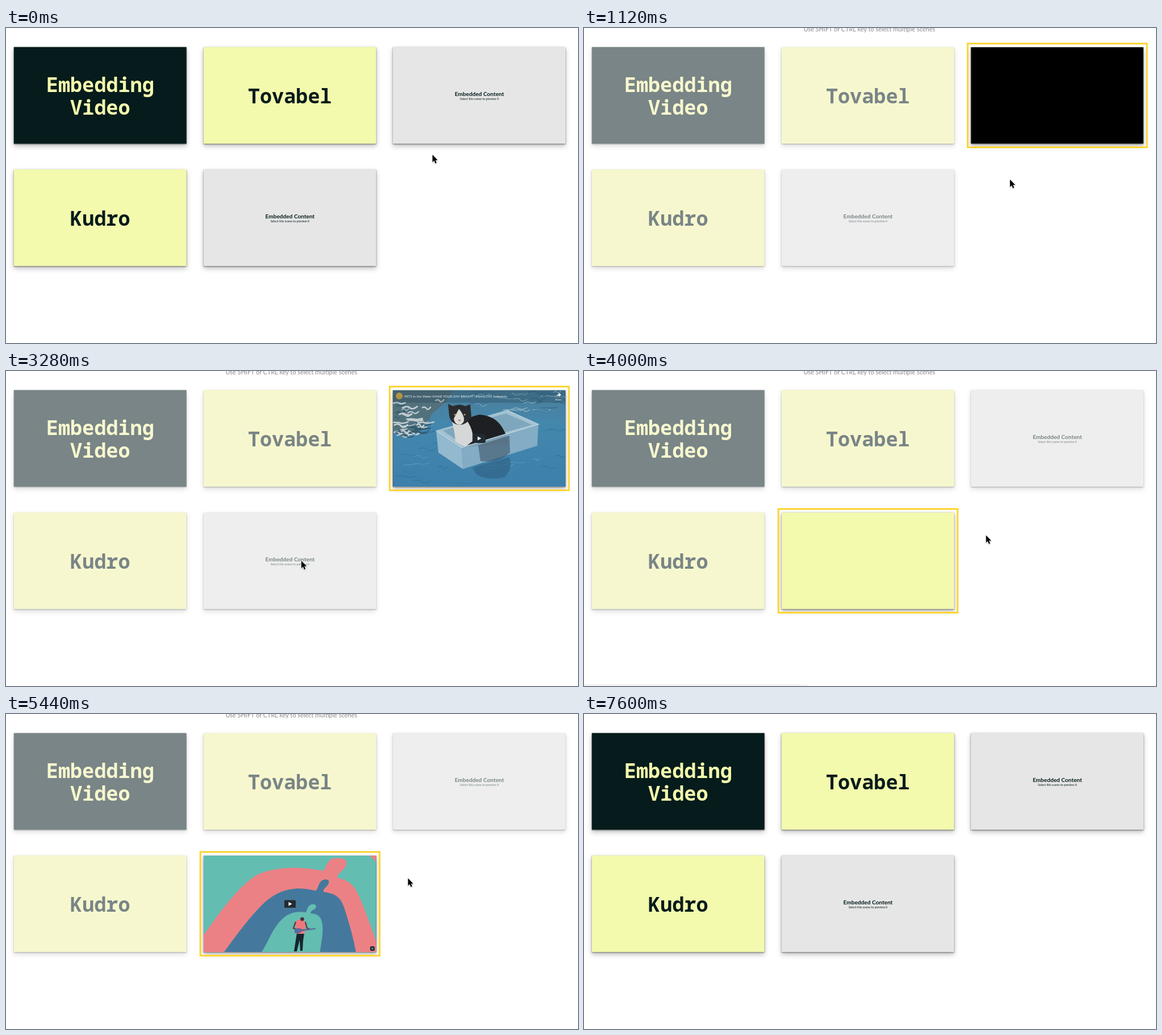
Animation, 1007 px wide and 556 px high, one loop 7.68 s. Source, as an HTML page:

```html
<!DOCTYPE html>
<html lang="en">
<head>
<meta charset="utf-8">
<title>Embedding Video</title>
<style>
  html, body { margin: 0; width: 100%; height: 100%; overflow: hidden; background: #fff; }
  svg { display: block; width: 1007px; height: 556px; }
  text { text-anchor: middle; font-family: Lato, sans-serif; }
  .card { --ink: #061b1b; --pale: #f3f9ad; --grey: #e6e6e6; --near: .5; --far: .24; }
  .dim { --ink: #798586; --pale: #f7f7cf; --grey: #eeeeee; --near: .27; --far: .13; }
  .face {
    filter: drop-shadow(0 1px 1px rgba(0, 0, 0, var(--near)))
            drop-shadow(0 4px 4.5px rgba(0, 0, 0, var(--far)));
  }
  .ink { fill: var(--ink); }
  .pale { fill: var(--pale); }
  .grey { fill: var(--grey); }
  .big { font: bold 35.2px "Noto Sans Mono", monospace; }
  .head { font-size: 10.1px; font-weight: bold; }
  .sub { font-size: 5.25px; }
  .ring { fill: none; stroke: #fdd535; stroke-width: 3; }
  #hint { font-size: 10.95px; fill: #8a8a8a; }
  #ripples { filter: blur(.5px); }
  #cat { filter: blur(.4px); }
</style>
</head>
<body>
<svg viewBox="0 0 1007 556" xmlns="http://www.w3.org/2000/svg">
  <defs>
    <clipPath id="frame"><rect width="303.5" height="170"/></clipPath>
    <linearGradient id="water" x2="0" y2="1">
      <stop offset="0" stop-color="#4c7d98"/>
      <stop offset=".35" stop-color="#4487ad"/>
      <stop offset="1" stop-color="#3c80ab"/>
    </linearGradient>

    <g id="pool" clip-path="url(#frame)">
      <rect width="304" height="170" fill="url(#water)"/>
      <path d="M0 0H104L92 22 70 40 56 66 20 84 0 72Z" fill="#52717d"/>
      <g id="ripples" fill="none" stroke-linecap="round"/>
      <g id="cat">
        <path d="M140 136 205 118Q212 138 196 154 166 160 146 148Z" fill="#2f5f80" opacity=".6"/>
        <path d="M76 71 200 35 256 60 121 102Z" fill="#a3c1d0"/>
        <path d="M88 71 199 41 245 61 122 95Z" fill="#7ea7bd"/>
        <path d="M126 60Q131 47 152 43 181 45 193 67 204 85 201 94L124 101Z" fill="#1d1f23"/>
        <path d="M103 52Q113 57 129 52 143 71 140 90L127 100 110 91Q109 73 103 52Z" fill="#d6d8d8"/>
        <path d="M97 24 105 28Q118 23 127 28L136 25 138 47Q130 61 117 61 102 60 99 45Z" fill="#2a2b2f"/>
        <path d="M116 33Q122 39 125 49 126 59 117 61 108 60 107 50Z" fill="#dedcd6"/>
        <path d="M114 52H120L117 55Z" fill="#a98281"/>
        <circle cx="109" cy="43" r="1.5" fill="#a6a66a"/>
        <circle cx="126" cy="43" r="1.5" fill="#a6a66a"/>
        <path d="M76 71 121 101 123 139 80 110Z" fill="#9dbfd3" opacity=".9"/>
        <path d="M121 101 256 60 254 98 123 139Z" fill="#8cb2c9" opacity=".88"/>
        <path d="M150 97 205 80 206 110Q186 129 154 125Z" fill="#3e5468" opacity=".6"/>
        <path d="M76 71 121 101 256 60 200 35" fill="none" stroke="#bcd3de" stroke-width="1.5"/>
      </g>
      <rect width="304" height="22" fill="#102a38" opacity=".22"/>
      <circle cx="11" cy="10" r="6" fill="#b19345"/>
      <text x="20" y="12.5" font-size="6" fill="#e8eef0" style="text-anchor:start">PETS in the Water MAKE YOUR DAY BRIGHT - Funny CAT moments</text>
      <path d="M288 11Q289 7 292 7V4.500L296 8 292 11.500V9Q290 9 288 11Z" fill="#fff"/>
      <text x="291" y="18" font-size="4.5" fill="#fff">Share</text>
      <rect x="140" y="77" width="23" height="16" rx="3" fill="#202a31"/>
      <path d="M149 81.500V88.500L155.500 85Z" fill="#fff"/>
    </g>

    <g id="arches" clip-path="url(#frame)">
      <rect width="304" height="170" fill="#63bdb1"/>
      <path d="M291 0H304V13Q300 5 291 0Z" fill="#ec8185"/>
      <path d="M0 140C26 104 57 58 92 35 125 18 174 19 210 27 218 19 218 6 229 5 247 3 253 7 251 16 249 26 238 27 235 39 253 42 264 51 272 68 284 95 294 124 304 152V170H0Z" fill="#ec8185"/>
      <path d="M36 170C58 140 82 106 109 81 137 57 165 54 197 62 203 57 201 47 210 43 219 40 223 45 219 51 216 56 210 58 211 64 230 67 241 72 247 91 255 115 264 146 268 170Z" fill="#44799d"/>
      <path d="M102 170C113 153 119 136 128 124 140 108 153 96 180 100 183 94 183 88 190 86 198 85 200 89 196 94 191 97 187 99 189 102 202 103 207 108 209 122 211 140 206 156 205 170Z" fill="#63bdb1"/>
      <path d="M164 137H177L175 151 174 168H170L169 149 164 169H159Z" fill="#15262e"/>
      <path d="M162 116Q171 109 179 117L178 138H163Z" fill="#ed777d"/>
      <path d="M162 117 158 128 170 133M179 117 182 128 187 130" fill="none" stroke="#6b3e42" stroke-width="2.500"/>
      <circle cx="173.500" cy="112" r="3.300" fill="#4a3038"/>
      <path d="M160 130Q167 126 173 130L197 128V130L174 133Q166 140 160 136Z" fill="#596a9b"/>
      <rect x="142" y="78.500" width="20" height="13.500" rx="1.500" fill="#242b30"/>
      <path d="M149.500 81.800V88.800L155.500 85.300Z" fill="#fff"/>
      <rect x="293" y="160" width="8" height="8" rx="2.500" fill="#17272c"/>
      <path d="M295 164H299M297 162V166" stroke="#a9ccca" stroke-width=".8"/>
    </g>
  </defs>

  <rect width="1007" height="556" fill="#fff"/>
  <text id="hint" x="502.3" y="6">Use SHIFT or CTRL key to select multiple scenes</text>
  <g id="cards"></g>
  <path id="bar" d="M0 553H386Q393 553 398 556H0Z" fill="#f3f3f3"/>
  <path id="cursor" d="M0 0V13L3 10.300 5.100 15.200 7.200 14.300 5.200 9.500H9.200Z" fill="#000" stroke="#fff" stroke-width="1"
    paint-order="stroke" style="filter:drop-shadow(0 1px 1px rgba(0,0,0,.3))"/>
</svg>
<script>
const LOOP = 7680, STEP = 80;
const $ = id => document.getElementById(id);
const show = (el, on) => el.setAttribute("visibility", on ? "visible" : "hidden");

const big = (s, y, tone = "ink") => `<text class="big ${tone}" x="151.8" y="${y}">${s}</text>`;
const embed = `<g class="ink"><text class="head" x="152" y="86">Embedded Content</text>
  <text class="sub" x="152" y="92.700">Select this scene to preview it</text></g>`;

const cards = [
  { x: 14, y: 34, fill: "ink", body: big("Embedding", 79, "pale") + big("Video", 119, "pale") },
  { x: 348, y: 34, fill: "pale", body: big("Tovabel", 99) },
  { x: 681.3, y: 34, fill: "grey", body: embed, art: "pool", open: 560, close: 3600, black: 960, play: 1680 },
  { x: 14, y: 250, fill: "pale", body: big("Kudro", 99) },
  { x: 348, y: 250, fill: "grey", body: embed, art: "arches", open: 3600, close: 5680, black: 4160, play: 4160 }
];

$("cards").innerHTML = cards.map(c => `<g class="card" transform="translate(${c.x} ${c.y})">
  <rect class="face ${c.fill}" x="-.2" y="-.4" width="303.900" height="170.600"/>
  <g class="body">${c.body}</g>
  ${c.art ? `<g class="live"><rect class="load" width="303.500" height="170"/>
    <use href="#${c.art}"/><rect class="ring" x="-5.800" y="-6.500" width="315.500" height="183"/></g>` : ""}
</g>`).join("");

cards.forEach((c, i) => {
  c.el = $("cards").children[i];
  const pick = s => c.el.querySelector(s);
  Object.assign(c, { text: pick(".body"), live: pick(".live"), load: pick(".load"), clip: pick("use") });
});

// Seeded light streaks on the water
let seed = 7;
const rnd = () => (seed = seed * 16807 % 2147483647) / 2147483647;
const streak = (x, y, w, tone, thick) =>
  `<path d="M${x} ${y}q${w / 3} ${-5 * rnd()} ${w / 2} ${2 - 3 * rnd()}t${w / 2} ${-3 * rnd()}" stroke="${tone}" stroke-width="${thick}"/>`;
let waves = "";
for (let i = 0; i < 42; i++) {
  const y = 18 + rnd() * 62;
  waves += streak(rnd() * (96 - y * 0.8), y, 8 + rnd() * 22, rnd() < 0.6 ? "#c3cfd2" : "#355c70", 1 + rnd() * 2);
}
for (let i = 0; i < 34; i++) {
  waves += streak(130 + rnd() * 160, 2 + rnd() * 36, 10 + rnd() * 25, rnd() < 0.5 ? "#7fabc0" : "#3d7193", 1 + rnd());
}
for (let i = 0; i < 30; i++) {
  waves += streak(rnd() * 290, 70 + rnd() * 98, 10 + rnd() * 28, rnd() < 0.4 ? "#5594b9" : "#35769f", 0.8 + rnd());
}
$("ripples").innerHTML = waves;

// time, x, y of the pointer tip
const path = [
  [0, 750.8, 223.7], [80, 750.8, 223.7], [480, 800, 150], [640, 800, 150],
  [1040, 750, 267.5], [2400, 750, 267.5], [2800, 668.7, 280.3], [3280, 520, 335],
  [3600, 520, 335], [3920, 707.8, 290], [5760, 707.8, 290], [6240, 715, -24], [LOOP, 715, -24]
];

function pointer(t) {
  const i = path.findIndex(p => p[0] > t);
  const [a, b] = [path[i - 1], path[i]];
  const u = (t - a[0]) / (b[0] - a[0]);
  const e = u * u * (3 - 2 * u);
  return [a[1] + (b[1] - a[1]) * e, a[2] + (b[2] - a[2]) * e];
}

function draw(ms) {
  const t = Math.floor(ms % LOOP / STEP) * STEP;
  const picking = t >= 560 && t < 5680;
  show($("hint"), picking);
  show($("bar"), t >= 3600 && t < 4640);
  for (const c of cards) {
    const on = t >= c.open && t < c.close;
    c.el.classList.toggle("dim", picking && !on);
    if (!c.art) continue;
    show(c.text, !on);
    show(c.live, on);
    show(c.clip, on && t >= c.play);
    c.load.setAttribute("fill", t < c.black ? "#f3f9ad" : "#000");
  }
  $("cursor").setAttribute("transform", `translate(${pointer(t)})`);
}

let start;
function tick(now) {
  start ??= now;
  draw(Math.max(0, now - start));
  requestAnimationFrame(tick);
}
draw(0);
requestAnimationFrame(tick);
</script>
</body>
</html>
```
